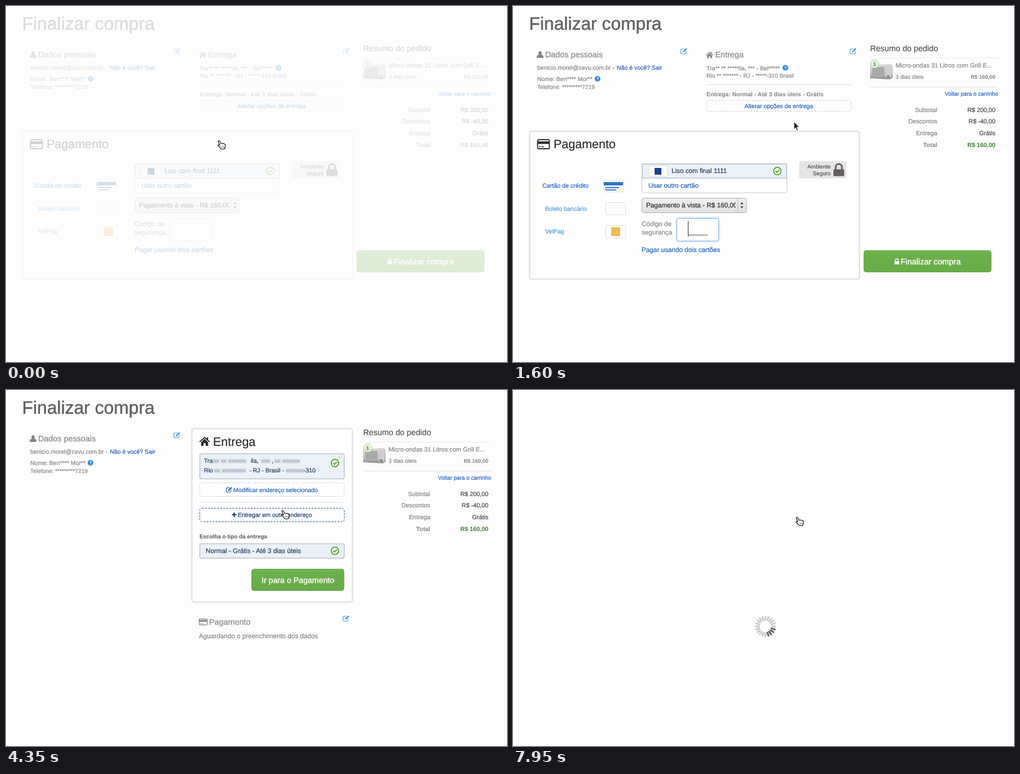
An HTML page for the animation above (8000 ms loop, 888 px wide and 631 px high).

```html
<!DOCTYPE html>
<html lang="pt-BR">
<head>
<meta charset="utf-8">
<title>Finalizar compra</title>
<style>
html, body { margin: 0; width: 100%; height: 100%; overflow: hidden; background: #fdfdfd; }
svg { display: block; width: 888px; height: 631px; font-family: "Liberation Sans", Arial, Helvetica, sans-serif; text-rendering: geometricPrecision; }
text { white-space: pre; fill: currentColor; stroke: currentColor; stroke-width: .2; }
.title { font-size: 31.8px; color: #616161; stroke-width: .5; }
.s { font-size: 10.5px; }
.m { font-size: 11.7px; }
.h { font-size: 14.35px; }
.big { font-size: 21.5px; }
.b { font-weight: bold; stroke-width: 0; }
.r { text-anchor: end; }
.grey { color: #848484; }
.link { color: #1b62c2; }
.soft { color: #4a9edc; }
.navy { color: #1d3c66; }
.dark { color: #2b2b2b; }
.white { color: #fff; stroke-width: .4; }
.rule { stroke: #ddd; }
.panel { fill: #fefefe; stroke: #e2e2e2; stroke-width: 2.5; }
.thumb { fill: #fff; stroke: #dedede; }
.pick { fill: #eaf1f7; stroke: #bcc4cc; stroke-width: 1.5; }
.dash { fill: none; stroke: currentColor; stroke-dasharray: 3.2 2.2; }
.blur { color: #7f8c9c; filter: blur(1.1px); }

/* one loop: 8s, 1% = 80ms */
.page, .first, .second, .cta, .late, .field, .caret, .hov, .hov .dash,
.mouse, .hand, .arrow, .beam, .spin, .spin g { animation: 8s step-end infinite; }
.page { animation-name: page; }
.first { animation-name: first; }
.second { animation-name: second; }
.cta { animation-name: cta; }
.late { animation-name: late; }
.field { animation-name: field; }
.caret { animation-name: caret; }
.alter { animation-name: alter; }
.alter .dash { animation-name: alterLine; }
.modify { animation-name: modify; }
.modify .dash { animation-name: modifyLine; }
.other { animation-name: other; }
.other .dash { animation-name: otherLine; }
.mouse { animation-name: mouse; }
.hand { animation-name: hand; }
.arrow { animation-name: arrow; }
.beam { animation-name: beam; }
.spin { animation-name: spin; }
.spin g { animation-name: turn; }

@keyframes page {
  0% { opacity: .21; }
  .75% { opacity: .6; }
  2.125% { opacity: 1; }
  92.025% { opacity: 1; animation-timing-function: steps(6); }
  99.375%, 100% { opacity: 0; }
}
@keyframes first { 0% { opacity: 1; } 42.875%, 100% { opacity: 0; } }
@keyframes second { 0% { opacity: 0; } 42.875%, 100% { opacity: 1; } }
@keyframes cta {
  0%, 42.875% { opacity: .76; animation-timing-function: steps(3); }
  45.5%, 100% { opacity: 1; }
}
@keyframes late { 0% { opacity: 0; } 45.5%, 100% { opacity: 1; } }
@keyframes field {
  0%, 8.25% { stroke: #ccc; filter: drop-shadow(0 0 0 #66afe900); animation-timing-function: linear; }
  10.75%, 36% { stroke: #78b8ec; filter: drop-shadow(0 0 2px #66afe9b0); animation-timing-function: linear; }
  38.5%, 100% { stroke: #ccc; filter: drop-shadow(0 0 0 #66afe900); }
}
@keyframes caret { 0% { opacity: 0; } 8.25% { opacity: 1; } 36%, 100% { opacity: 0; } }
@keyframes alter { 0% { color: #1b62c2; } 32%, 100% { color: #123e78; } }
@keyframes alterLine { 0% { stroke: #ccc; } 32%, 100% { stroke: #1d4f8c; } }
@keyframes modify { 0% { color: #123e78; } 51.5%, 100% { color: #1b62c2; } }
@keyframes modifyLine { 0% { stroke: #1d4f8c; } 51.5%, 100% { stroke: #b9cfe2; } }
@keyframes other { 0% { color: #1b62c2; } 53.75%, 100% { color: #123e78; } }
@keyframes otherLine { 0% { stroke: #ccc; } 53.75%, 100% { stroke: #1d4f8c; } }
@keyframes mouse {
  0%, 5.125% { transform: translate(382px, 246px); animation-timing-function: steps(7); }
  10.25% { transform: translate(397px, 258px); animation-timing-function: steps(7); }
  15.875% { transform: translate(488px, 237px); animation-timing-function: steps(6); }
  20%, 21.5% { transform: translate(502px, 213px); animation-timing-function: steps(6); }
  26% { transform: translate(508px, 114px); animation-timing-function: steps(5); }
  29.75% { transform: translate(510px, 156.5px); animation-timing-function: steps(3); }
  32% { transform: translate(489px, 182px); }
  33%, 50% { transform: translate(488.5px, 183px); animation-timing-function: steps(6); }
  54.375% { transform: translate(495px, 221px); animation-timing-function: steps(8); }
  60.25% { transform: translate(507px, 234px); }
  65.5% { transform: translate(508px, 234px); }
  67.75%, 100% { transform: translate(508px, 233px); }
}
@keyframes hand { 0% { opacity: 1; } 5.875% { opacity: 0; } 32%, 100% { opacity: 1; } }
@keyframes arrow { 0% { opacity: 0; } 5.875% { opacity: 1; } 29.7%, 100% { opacity: 0; } }
@keyframes beam { 0% { opacity: 0; } 29.7% { opacity: 1; } 32%, 100% { opacity: 0; } }
@keyframes spin { 0% { opacity: 0; } 96.9%, 100% { opacity: 1; } }
@keyframes turn {
  0%, 96.9% { transform: rotate(-36deg); animation-timing-function: steps(2); }
  99.375%, 100% { transform: rotate(0deg); }
}
</style>
</head>
<body>
<svg viewBox="0 0 888 631">
<defs>
  <linearGradient id="green" x2="0" y2="1"><stop stop-color="#6fb74f"/><stop offset=".2" stop-color="#6bb04b"/><stop offset="1" stop-color="#68ac48"/></linearGradient>
  <linearGradient id="grey" x2="0" y2="1"><stop stop-color="#f0f0f0"/><stop offset="1" stop-color="#dfdfdf"/></linearGradient>
  <linearGradient id="steel" x2="0" y2="1"><stop stop-color="#d9d9d9"/><stop offset=".7" stop-color="#bdbdbd"/><stop offset="1" stop-color="#858585"/></linearGradient>
  <g id="edit" fill="none" stroke="currentColor">
    <path d="M3.500 1v2.500q0 1.500-1.500 1.500h-6q-1.500 0-1.500-1.500v-5.500q0-1.500 1.500-1.500h5" stroke-width="1.200"/>
    <path d="M-1.500 2L4.800-4" stroke-width="2.600"/>
  </g>
  <path id="house" d="M0-7L-7.500-.2-6.500 1 0-5 6.500 1 7.500-.2 5-2.500V-6H3v1.700ZM0-4L-5 1V6H-1.500V2.200H1.500V6H5V1Z" fill="currentColor"/>
  <g id="card">
    <rect x="-10.500" y="-8" width="21" height="16" rx="2" fill="none" stroke="currentColor" stroke-width="1.800"/>
    <path d="M-10.500-5h21v4.500h-21ZM-8 3.500h3v1.800h-3ZM-3.500 3.500h4v1.800h-4Z" fill="currentColor"/>
  </g>
  <g id="lock" fill="currentColor">
    <rect x="-9.500" y="-1" width="19" height="12" rx="1.500"/>
    <path d="M-5.500 0v-5a5.500 5.500 0 0 1 11 0v5" fill="none" stroke="currentColor" stroke-width="3"/>
  </g>
  <g id="check" fill="none" stroke="#55a630" stroke-width="2">
    <circle r="6.500" fill="#fafdf8"/><path d="M-3.200 0L-.8 2.400 3.300-2"/>
  </g>
  <g id="help">
    <circle r="5" fill="#2d86d6"/>
    <text class="b" y="3" font-size="8.500" text-anchor="middle" color="#fff">?</text>
  </g>
  <clipPath id="cut"><path d="M230 340h165v27h-165Z"/></clipPath>
</defs>

<g class="page">
  <text class="title" x="28.500" y="42">Finalizar compra</text>

  <g class="grey">
    <path d="M48 80a3.200 3.500 0 0 1 1.700 6.300q4.300.4 4.300 4.200 0 1.500-1.500 1.500h-9q-1.500 0-1.500-1.500 0-3.800 4.300-4.200A3.200 3.500 0 0 1 48 80Z" fill="currentColor"/>
    <text class="h" x="57" y="91">Dados pessoais</text>
    <text class="s" x="43" y="113">benicio.morel@zavu.com.br -</text>
    <text class="s" x="43" y="133">Nome: Ben**** Mor**</text>
    <text x="43" y="146.500" font-size="10.150">Telefone: *********7219</text>
  </g>
  <text class="s link" x="184" y="113">Não é você? Sair</text>
  <use href="#help" x="149.800" y="129"/>
  <use href="#edit" class="soft" x="303" y="79.500"/>

  <text class="h" x="633" y="80" color="#505050">Resumo do pedido</text>
  <path class="rule" d="M633 92.500h227" stroke-dasharray="1 1"/>
  <path class="rule" d="M633 143.500h227"/>
  <path d="M633 104l37-1 3 3v21l-5 3-35-2Z" fill="url(#steel)"/>
  <path d="M637 108h21v16h-21Z" fill="#aaa"/>
  <path d="M661 106h9v21h-9Z" fill="#cfcfcf"/>
  <circle cx="665" cy="125" r="2.500" fill="#868686"/>
  <circle cx="641" cy="102.500" r="7.500" fill="#e4f1dc" stroke="#bcd8ae"/>
  <text class="b" x="641" y="106" font-size="9" text-anchor="middle" color="#3b7a2a">1</text>
  <g class="grey">
    <text x="678" y="109" font-size="10.950">Micro-ondas 31 Litros com Grill E...</text>
    <text x="678" y="128.500" font-size="9.900">3 dias úteis</text>
    <text class="b r" x="855" y="128.500" font-size="9.500">R$ 160,00</text>
  </g>
  <text class="r link" x="860" y="158.500" font-size="9.900">Voltar para o carrinho</text>
  <g class="r grey" font-size="10.800">
    <text x="752" y="187.500">Subtotal</text>
    <text x="752" y="208">Descontos</text>
    <text x="752" y="228.500">Entrega</text>
    <text class="b" x="752" y="249.500">Total</text>
  </g>
  <g class="r" font-size="10.800" color="#444">
    <text x="855" y="187.500">R$ 200,00</text>
    <text x="855" y="208">R$ -40,00</text>
    <text x="855" y="228.500">Grátis</text>
    <text class="b" x="855" y="249.500" color="#3d8530">R$ 160,00</text>
  </g>

  <g class="first">
    <g class="grey">
      <use href="#house" transform="translate(348.500 87) scale(.88)"/>
      <text class="h" x="358.500" y="91">Entrega</text>
      <text x="343" y="113.500" font-size="10.400">Tra** ** *****ila, *** - Bel*****</text>
      <text x="343" y="127" font-size="10.150">Rio ** ******* - RJ - *****-310 Brasil</text>
      <text class="s b" x="343" y="160">Entrega: Normal - Até 3 dias úteis - Grátis</text>
    </g>
    <use href="#help" x="482.800" y="109.500"/>
    <use href="#edit" class="soft" x="603" y="79.500"/>
    <path class="rule" d="M343 139.500h257"/>
    <g class="hov alter">
      <rect class="dash" x="343.500" y="167.500" width="256" height="19" rx="4"/>
      <text x="471" y="180.500" font-size="10.570" text-anchor="middle">Alterar opções de entrega</text>
    </g>

    <rect class="panel" x="29.500" y="222" width="584.500" height="262" rx="4"/>
    <use href="#card" class="dark" x="54" y="245"/>
    <text class="big dark" x="72" y="252">Pagamento</text>

    <text class="link" x="52" y="321.500" font-size="10.700">Cartão de crédito</text>
    <g class="soft" font-size="10.650">
      <text x="57" y="362.500">Boleto bancário</text>
      <text x="57" y="403">VelPag</text>
    </g>
    <rect class="thumb" x="160.500" y="308.500" width="35" height="21" rx="2"/>
    <path d="M161 312h34v6h-34ZM163.500 321h24v2h-24ZM163.500 325h19v2h-19Z" fill="#2f78c8"/>
    <rect class="thumb" x="164.500" y="348.500" width="35" height="21.500" rx="2"/>
    <rect class="thumb" x="164.500" y="389.500" width="35" height="21.500" rx="2"/>
    <rect x="174" y="392" width="16" height="16" fill="#f0bd55"/>

    <rect x="228.500" y="279.500" width="257" height="51.500" rx="2" fill="#fff" stroke="#ccc"/>
    <rect class="pick" x="229" y="280" width="256" height="25"/>
    <rect class="thumb" x="240.500" y="283.500" width="33" height="18.500" rx="2"/>
    <rect x="251" y="287" width="12" height="12" fill="#22408f"/>
    <text class="m navy" x="281" y="296">Liso com final 1111</text>
    <use href="#check" x="468.500" y="292.500"/>
    <text class="link" x="240" y="321.500" font-size="11.500">Usar outro cartão</text>

    <rect x="228.500" y="340.500" width="185.500" height="26" rx="4" fill="url(#grey)" stroke="#b3b3b3"/>
    <path d="M398.500 341v25" stroke="#bbb"/>
    <path d="M403 351.500l2.700-4 2.700 4ZM403 355l2.700 4 2.700-4Z" fill="#444"/>
    <g clip-path="url(#cut)"><text class="m dark" x="236" y="357">Pagamento à vista - R$ 160,00</text></g>

    <g class="grey" font-size="11.600">
      <text x="228" y="390">Código de</text>
      <text x="228" y="404.500">segurança</text>
    </g>
    <rect class="field" x="290.500" y="376.500" width="74" height="40" rx="3" fill="#fff" stroke="#ccc"/>
    <path class="caret" d="M310.500 381v28M310 406h35" fill="none" stroke="#4f4545" stroke-width="1.200"/>
    <text class="m link" x="228" y="435.500">Pagar usando dois cartões</text>

    <rect x="507" y="275" width="84" height="30.500" rx="3" fill="#e5e5e5"/>
    <g class="r" font-size="9.750" color="#555">
      <text x="563" y="287.500">Ambiente</text>
      <text x="563" y="299.500">Seguro</text>
    </g>
    <use href="#lock" x="577.500" y="290.500" color="#675f5f"/>

    <rect x="622" y="433.500" width="225.500" height="38" rx="4" fill="url(#green)" stroke="#5fa243"/>
    <use href="#lock" transform="translate(680.300 453) scale(.45)" color="#fff"/>
    <text class="white" x="687" y="458" font-size="14.450">Finalizar compra</text>
  </g>

  <g class="second">
    <rect class="panel" x="329.500" y="68.500" width="284.500" height="307.500" rx="4"/>
    <use href="#house" class="dark" transform="translate(352 91.500) scale(1.250)"/>
    <text class="big dark" x="367" y="98.500">Entrega</text>
    <rect class="pick" x="343.500" y="113" width="256" height="44.500" rx="3"/>
    <g class="navy" font-size="10.600">
      <text x="351" y="128.500">Tra</text>
      <text class="blur" x="367" y="128.500">xx xx xxxxxx</text>
      <text x="434" y="128.500">ila,</text>
      <text class="blur" x="452" y="128.500">xxx</text>
      <text x="471" y="128.500">,</text>
      <text class="blur" x="476" y="128.500">xx xxxxxx</text>
      <text x="351" y="146">Rio</text>
      <text class="blur" x="369" y="146">xx xxxxxxxx</text>
      <text x="431" y="146">- RJ - Brasil -</text>
      <text class="blur" x="496" y="146">xxxxxx</text>
      <text x="527.500" y="146">-310</text>
    </g>
    <use href="#check" x="583" y="129.500"/>
    <g class="hov modify">
      <rect class="dash" x="343.500" y="164.500" width="256" height="24" rx="4"/>
      <use href="#edit" transform="translate(395.500 176.500) scale(.9)"/>
      <text x="403" y="180.500" font-size="10.620">Modificar endereço selecionado</text>
    </g>
    <path class="rule late" d="M343 199.500h257"/>
    <g class="hov other">
      <rect class="dash" x="343.500" y="209.500" width="256" height="24" rx="4"/>
      <path d="M404.500 217v8M400.500 221h8" stroke="currentColor" stroke-width="2.200"/>
      <text class="s" x="411" y="225">Entregar em outro endereço</text>
    </g>
    <text class="b" x="343" y="263" font-size="9.860" color="#555">Escolha o tipo da entrega</text>
    <rect class="pick" x="343.500" y="272.500" width="256" height="25.500" rx="3"/>
    <text class="m navy" x="354" y="289">Normal - Grátis - Até 3 dias úteis</text>
    <use href="#check" x="583" y="285"/>
    <g class="cta">
      <rect x="435.500" y="317.500" width="163.500" height="38" rx="4" fill="url(#green)" stroke="#5fa243"/>
      <text class="white" x="453" y="342" font-size="14.150">Ir para o Pagamento</text>
    </g>
    <g class="grey">
      <use href="#card" transform="translate(349.500 411) scale(.68)"/>
      <text class="h" x="360" y="416">Pagamento</text>
      <text class="m" x="342" y="440">Aguardando o preenchimento dos dados</text>
    </g>
    <use href="#edit" class="soft" x="603" y="404.500"/>
  </g>
</g>

<g transform="translate(447.500 419)"><g class="spin"><g id="ticks" stroke-width="3" stroke-linecap="round"></g></g></g>

<g class="mouse">
  <g class="hand">
    <path d="M-6-6.500Q-4.800-8.500-3.200-6.500L-1-2Q.8-3.500 2-2 3.800-3 4.700-1.300 6.500-1.800 6.700.5V3.200Q6.300 5 5.300 7.500H-.8Q-2 4.800-5.500 2.300-7 .4-5.200-.2-4 0-3.200.8Z" fill="#fff" stroke="#111" stroke-width="1.200" stroke-linejoin="round"/>
    <path d="M.5 2v3.500M2.500 2v3.500M4.400 2v3.500" stroke="#444" stroke-width=".7"/>
  </g>
  <path class="arrow" d="M-4-8V5.500L-1 2.700 1.200 7.700 3.400 6.700 1.200 1.900H5.300Z" fill="#1a1a1a" stroke="#fff" stroke-width=".9"/>
  <path class="beam" d="M-3.500-6.500Q0-6.500 0-4.500V4.500Q0 6.500-3.500 6.500M3.500-6.500Q0-6.500 0-4.500M0 4.500Q0 6.500 3.500 6.500M-2 2H2" fill="none" stroke="#222" stroke-width="1.300"/>
</g>
</svg>
<script>
const ticks = document.getElementById('ticks');
for (let i = 0; i < 20; i++) {
  const tick = document.createElementNS('http://www.w3.org/2000/svg', 'path');
  tick.setAttribute('d', 'M11.500 0H17.500');
  tick.setAttribute('transform', `rotate(${i * 18})`);
  tick.setAttribute('stroke', i > 0 && i < 5 ? '#555' : '#c8c8c8');
  ticks.append(tick);
}
</script>
</body>
</html>
```
